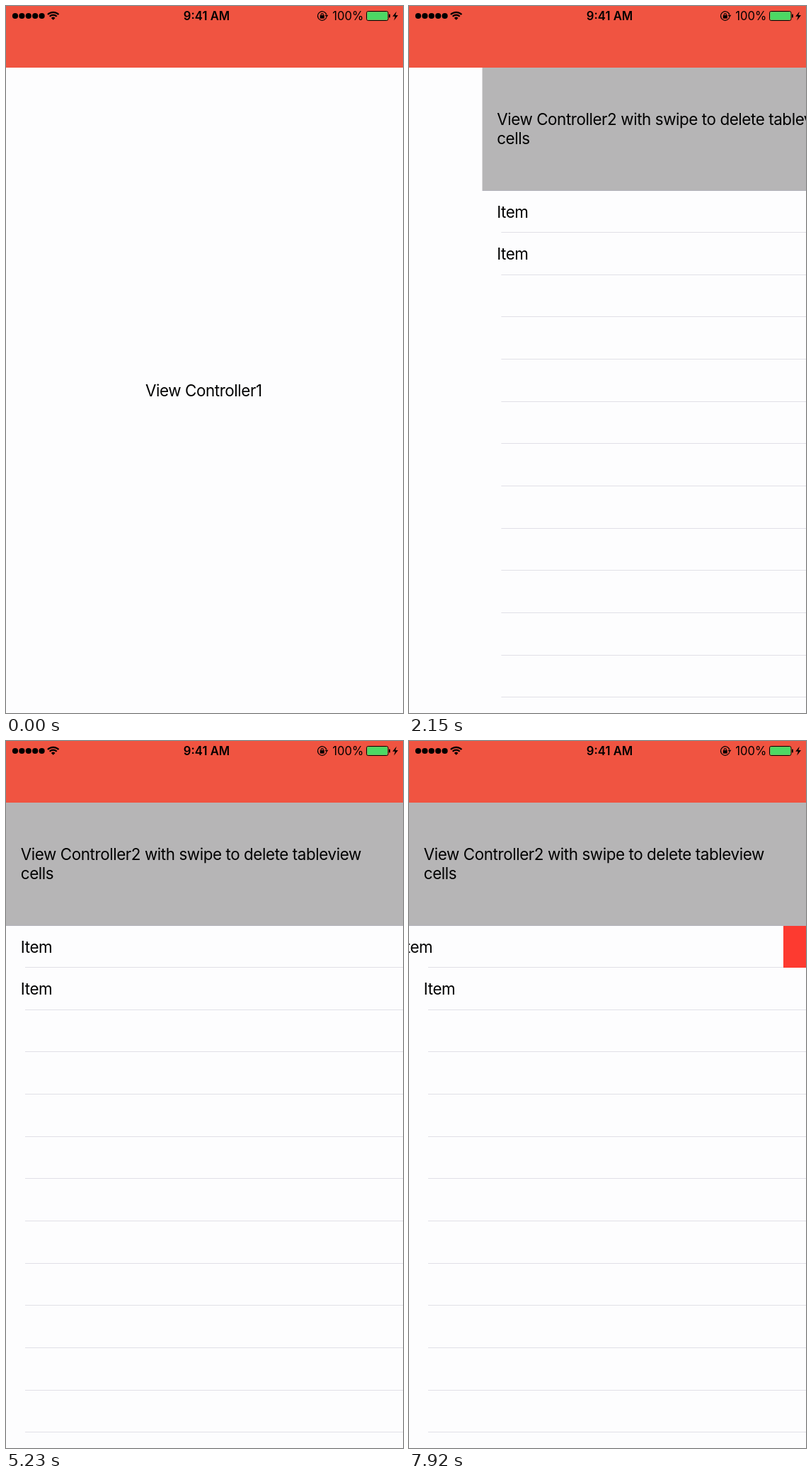
An HTML page with a canvas for the animation above (8 s loop, 561 by 998 pixels).

```html
<!DOCTYPE html>
<html lang="en">
<head>
<meta charset="utf-8">
<title>Swipe between view controllers</title>
<style>
  html, body { margin: 0; width: 100%; height: 100%; overflow: hidden; background: #fdfdfe; }
  canvas { display: block; }
</style>
</head>
<body>
<canvas id="stage" width="561" height="998"></canvas>
<script>
const ctx = document.getElementById('stage').getContext('2d');
const W = 561, H = 998, LOOP = 8000;
const ROW_TOP = 260.5, ROW_HEIGHT = 59.65;
const FONT = 'Inter, Roboto, sans-serif';
const PAPER = '#fdfdfe';

// Key poses as [time, offset]
const pageKeys = [[1100, 0], [1520, 18], [1890, 192], [2080, 400], [2250, 515], [2430, 556], [2600, 561]];
const swipeKeys = [[5350, 0], [5900, 110], [6200, 181], [6500, 181], [6950, 110], [7400, 35], [7900, 32]];

// Monotone cubic interpolation through the key poses
function follow(keys, t) {
  const last = keys.length - 1;
  if (t <= keys[0][0]) return keys[0][1];
  if (t >= keys[last][0]) return keys[last][1];
  const slope = i => i < 0 || i >= last ? 0
    : (keys[i + 1][1] - keys[i][1]) / (keys[i + 1][0] - keys[i][0]);
  const tangent = i => {
    const a = slope(i - 1), b = slope(i);
    return a * b > 0 ? 2 * a * b / (a + b) : 0;
  };
  const i = keys.findIndex(k => k[0] > t) - 1;
  const [t0, v0] = keys[i], [t1, v1] = keys[i + 1];
  const span = t1 - t0, u = (t - t0) / span, r = 1 - u;
  return v0 * r * r * (1 + 2 * u) + v1 * u * u * (3 - 2 * u)
    + span * u * r * (tangent(i) * r - tangent(i + 1) * u);
}

function rect(x, y, w, h, color) {
  ctx.fillStyle = color;
  ctx.fillRect(x, y, w, h);
}

function text(str, x, y, { size = 22.4, weight = 400, color = '#000', align = 'left', spacing = -0.42 } = {}) {
  ctx.font = `${weight} ${size}px ${FONT}`;
  ctx.letterSpacing = spacing + 'px';
  ctx.textAlign = align;
  ctx.fillStyle = color;
  ctx.fillText(str, x, y);
}

function disc(x, y, r) {
  ctx.beginPath();
  ctx.arc(x, y, r, 0, 7);
  ctx.fill();
}

function polygon(...points) {
  ctx.beginPath();
  points.forEach(p => ctx.lineTo(...p));
  ctx.fill();
}

function arc(x, y, r, from, to, width) {
  ctx.lineWidth = width;
  ctx.beginPath();
  ctx.arc(x, y, r, from, to);
  ctx.stroke();
}

function roundRect(x, y, w, h, r) {
  ctx.beginPath();
  ctx.roundRect(x, y, w, h, r);
}

function drawTable(swipe) {
  rect(0, 87, W, H - 87, PAPER);
  rect(0, 87, W, 173, '#b6b5b6');
  rect(0, 260, W, 1, '#b2b2ba');
  text('View Controller2 with swipe to delete tableview', 20.8, 168);
  text('cells', 20.8, 195);

  text('Item', 20.8 - swipe, 298.5);
  text('Item', 20.8, 358);
  for (let i = 1; i <= 12; i++) {
    rect(27, Math.round(ROW_TOP + i * ROW_HEIGHT) - 1, W - 27, 1, '#e1e0e7');
  }

  if (swipe > 0) {
    const left = W - swipe;
    rect(left, 261, swipe, 59, '#fd3a30');
    text('Delete', left + Math.max(swipe, 135) / 2, 298.5,
      { size: 23.9, color: '#fff', align: 'center', spacing: -0.5 });
  }
}

function drawStatusBar() {
  rect(0, 0, W, 87, '#f05441');
  ctx.fillStyle = ctx.strokeStyle = '#000';
  for (let i = 0; i < 5; i++) disc(13 + i * 9.4, 14, 4.1);

  // Wi-Fi
  const from = -Math.PI * 0.75, to = -Math.PI * 0.25;
  arc(66.7, 19.8, 11, from, to, 2.3);
  arc(66.7, 19.8, 7.1, from, to, 2.3);
  arc(66.7, 19.8, 2, from, to, 4);

  // Rotation lock
  arc(446.8, 14, 6.3, 0.3, 6.0, 1.2);
  polygon([450.6, 12.8], [455.4, 12.8], [453, 16]);
  ctx.fillRect(443.8, 13, 6, 4.6);
  arc(446.8, 12.8, 1.9, Math.PI, 0, 1.1);

  // Battery and charging bolt
  ctx.lineWidth = 1;
  roundRect(509.5, 7.5, 30.5, 13, 2.2);
  ctx.stroke();
  roundRect(541, 11.5, 1.8, 5, 0.8);
  ctx.fill();
  polygon([551.8, 7.8], [546.2, 14.8], [549.8, 14.8], [548.2, 20.4], [554, 13], [550.3, 13]);
  ctx.fillStyle = '#4cd964';
  roundRect(510.3, 8.3, 28.9, 11.4, 1.4);
  ctx.fill();

  text('9:41 AM', 283.5, 20, { size: 16.7, weight: 600, align: 'center', spacing: 0 });
  text('100%', 505.3, 20, { size: 16.6, align: 'right', spacing: 0 });
}

function draw() {
  const t = performance.now() % LOOP;
  const page = follow(pageKeys, t);
  rect(0, 0, W, H, PAPER);
  text('View Controller1', 197 - page, 551);
  if (page > 0) {
    ctx.save();
    ctx.beginPath();
    ctx.rect(W - page, 87, page, H - 87);
    ctx.clip();
    ctx.translate(W - page, 0);
    drawTable(follow(swipeKeys, t));
    ctx.restore();
  }
  drawStatusBar();
  requestAnimationFrame(draw);
}
draw();
</script>
</body>
</html>
```
